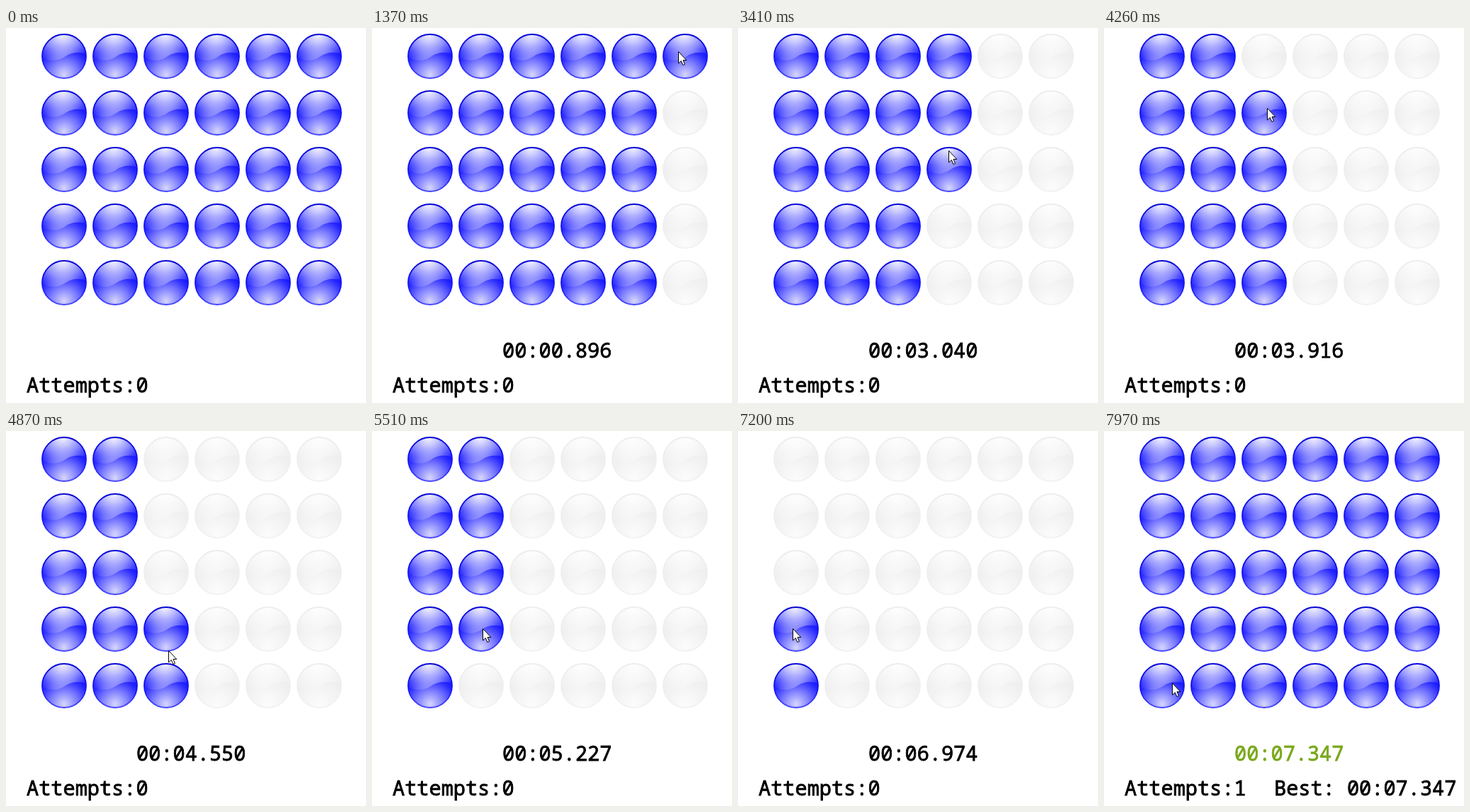
Animation of 508 by 530 pixels, one loop 8 s. Source, as an HTML page with a canvas:

```html
<!DOCTYPE html>
<html lang="en">
<head>
<meta charset="utf-8">
<title>Bubble sweep</title>
<style>
html, body { margin: 0; width: 100%; height: 100%; overflow: hidden; background: #fff; }
canvas { display: block; }
</style>
</head>
<body>
<canvas id="stage" width="508" height="530"></canvas>
<script>
const ctx = document.getElementById('stage').getContext('2d');
const LOOP = 8000, TICK = 40.22, START = 11, WIN = 186;
const COLS = 6, ROWS = 5, LAST = COLS * ROWS - 1;

// Pace of the sweep: [tick, balls passed, sideways sway, stopwatch ms]
const pace = [
  [0, -1.64, 34, 0], [START, 0.4, -1, 14], [32, 4.1, -2, 896], [63, 8.9, -5, 2206],
  [104, 15.93, 5, 3916], [135, 21, 3, 5227], [158, 25, -29, 6187], [WIN, 29.42, 8, 7347],
  [190, 28.96, 10, 7347], [193, 28.96, 10, 7347], [196, 28.96, 15, 7347]
];

function paceAt(tick) {
  let i = 1;
  while (i < pace.length - 1 && pace[i][0] < tick) i++;
  const a = pace[i - 1], b = pace[i];
  const u = Math.min(1, Math.max(0, (tick - a[0]) / (b[0] - a[0])));
  const [, step, sway, ms] = a.map((v, j) => v + (b[j] - v) * u);
  return { step, sway, ms };
}

// Balls in sweep order: right to left, first column upwards, then alternating
function ball(n) {
  const pass = Math.floor(n / ROWS), k = n % ROWS;
  const row = pass % 2 ? k : ROWS - 1 - k;
  return { x: 82 + 72 * (COLS - 1 - pass), y: 40 + 80 * row };
}

function pointerAt({ step, sway }) {
  const i = Math.floor(Math.min(LAST - 1, Math.max(0, step))), u = step - i;
  const a = ball(i), b = ball(i + 1);
  // Turns between columns swing outwards
  const swing = a.x === b.x ? 0 : 20 * Math.sin(Math.PI * u) * (a.y < 200 ? -1 : 1);
  return { x: a.x + (b.x - a.x) * u + sway, y: a.y + (b.y - a.y) * u + swing };
}

function makeBall(blue, alpha) {
  const cv = document.createElement('canvas');
  cv.width = cv.height = 68;
  const g = cv.getContext('2d');
  const tone = (l, b = 255) => `rgb(${l},${l},${blue ? b : l})`;
  const white = a => `rgba(255,255,255,${a})`;
  const fill = (grad, stops) => {
    stops.forEach(([p, c]) => grad.addColorStop(p, c));
    return grad;
  };
  const disc = () => { g.beginPath(); g.arc(0, 0, 31, 0, 7); };
  g.translate(34, 34);

  disc();
  g.fillStyle = fill(g.createRadialGradient(0, 26, 0, 0, 26, 41),
    [[0, tone(214)], [0.5, tone(118)], [0.85, tone(44)], [1, tone(22)]]);
  g.fill();

  // Wavy gloss over the upper half
  g.save();
  g.clip();
  g.beginPath();
  g.moveTo(-32, 1);
  g.bezierCurveTo(-20, 8, -8, 7, 2, 0);
  g.bezierCurveTo(9, -5, 20, -7, 32, -3);
  g.lineTo(32, -32);
  g.lineTo(-32, -32);
  g.fillStyle = fill(g.createRadialGradient(-2, -32, 0, -2, -32, 44),
    [[0, white(0.98)], [0.3, white(0.75)], [0.55, white(0.52)], [0.78, white(0.26)], [1, white(0.04)]]);
  g.fill();
  g.restore();

  disc();
  g.lineWidth = 1.8;
  g.strokeStyle = fill(g.createLinearGradient(0, -31, 0, 31),
    [[0, tone(6, 214)], [0.6, tone(20, 245)], [1, tone(72)]]);
  g.stroke();
  return { cv, alpha };
}
const full = makeBall(true, 1), faint = makeBall(false, 0.065);

const arrow = new Path2D('M0 0V16.5L3.8 13L6.4 19L9 17.9L6.5 12H11.3Z');

function drawPointer({ x, y }) {
  ctx.save();
  ctx.translate(Math.round(x) - 0.5, Math.round(y) - 0.5);
  ctx.fillStyle = '#fff';
  ctx.fill(arrow);
  ctx.strokeStyle = '#000';
  ctx.lineWidth = 1;
  ctx.stroke(arrow);
  ctx.restore();
}

function clock(ms) {
  const pad = (n, w) => String(Math.floor(n)).padStart(w, '0');
  return `${pad(ms / 60000, 2)}:${pad(ms / 1000 % 60, 2)}.${pad(ms % 1000, 3)}`;
}

// A thin outline gives a weight between regular and bold
function text(str, x, y, color = '#000') {
  ctx.fillStyle = ctx.strokeStyle = color;
  ctx.lineWidth = 0.8;
  ctx.fillText(str, x, y);
  ctx.strokeText(str, x, y);
}

function draw(time) {
  const tick = Math.floor((time % LOOP - 80) / TICK + 0.2);
  const won = tick >= WIN, now = paceAt(tick);
  ctx.fillStyle = '#fff';
  ctx.fillRect(0, 0, 508, 530);

  for (let n = 0; n <= LAST; n++) {
    const { x, y } = ball(n);
    const look = !won && now.step >= n + 0.4 ? faint : full;
    ctx.globalAlpha = look.alpha;
    ctx.drawImage(look.cv, x - 34, y - 34);
  }
  ctx.globalAlpha = 1;

  ctx.font = '28.6px "Noto Sans Mono", "DejaVu Sans Mono", monospace';
  const watch = clock(Math.round(now.ms));
  if (tick >= START) text(watch, 184, 466, won ? '#7aa81c' : '#000');
  text('Attempts:' + (won ? 1 : 0), 29, 515);
  if (won) text('Best: ' + watch, 240, 515);

  if (tick >= 0) drawPointer(pointerAt(now));
}

const begin = performance.now();
function loop() {
  draw(performance.now() - begin);
  requestAnimationFrame(loop);
}
loop();
</script>
</body>
</html>
```
